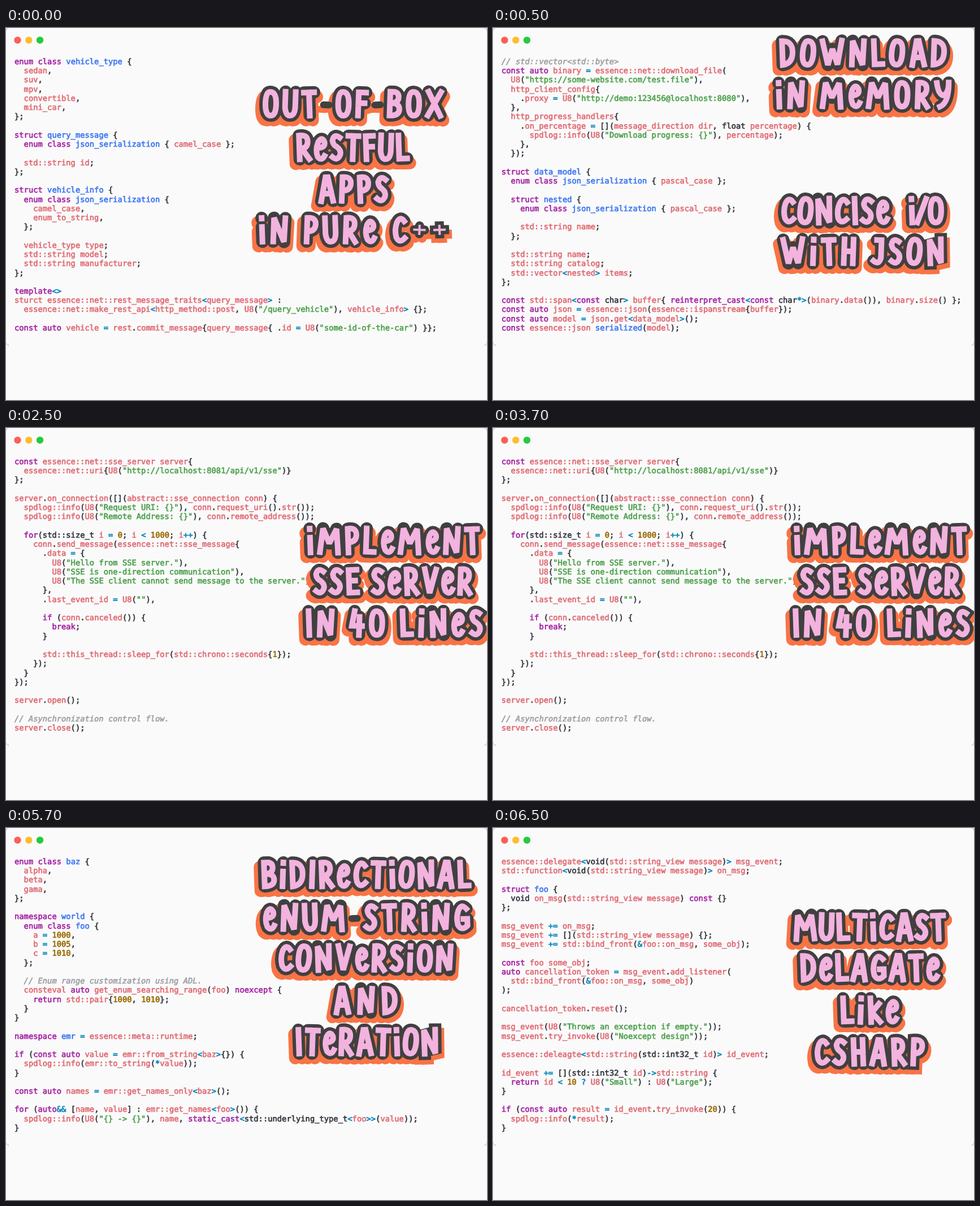
An HTML page for the animation above (8000 ms loop, 851x658 px).

```html
<!DOCTYPE html>
<html lang="en">
<head>
<meta charset="utf-8">
<title>C++ snippets</title>
<style>
html, body { margin: 0; width: 100%; height: 100%; overflow: hidden; background: #fafafa; }
svg { display: block; }
text {
  font: 13.79px "DejaVu Sans Mono", monospace;
  white-space: pre; text-rendering: geometricPrecision;
  fill: #383a42; stroke: #383a42; stroke-width: .7px;
}
.str { fill: #50a14f; stroke: #50a14f; }
.com { fill: #a0a1a7; stroke: #a0a1a7; font-style: italic; }
.def { fill: #4078f2; stroke: #4078f2; }
.key { fill: #a626a4; stroke: #a626a4; }
.num { fill: #986801; stroke: #986801; }
.var { fill: #e06c75; stroke: #e06c75; }
.op { fill: #0184bc; stroke: #0184bc; }
.title { fill: none; stroke-linecap: round; stroke-linejoin: round; }
.title :last-child { stroke-linecap: square; stroke-linejoin: miter; stroke-miterlimit: 2; }
</style>
</head>
<body>
<svg id="stage" width="851" height="658" viewBox="0 0 851 658">
  <path d="M0 5Q0 0 5 0M846 0Q851 0 851 5M851 556Q851 561 846 561M5 561Q0 561 0 556"
    fill="none" stroke="#555" stroke-dasharray="1 1.5"/>
  <circle cx="20.5" cy="21.5" r="6.2" fill="#ff5f56"/>
  <circle cx="40.3" cy="21.5" r="6.2" fill="#ffbd2e"/>
  <circle cx="60" cy="21.5" r="6.2" fill="#27c93f"/>
</svg>
<script>
// Each scene: start time, title lines [text, left, right, top], code.
const scenes = [
{ at: 0, title: [['OUT-OF-BOX', 448, 780, 113], ['ReSTFUL', 507, 720, 190],
  ['APPS', 546, 683, 264], ['iN PURe C++', 440, 787, 336]], code:
`enum class vehicle_type {
  sedan,
  suv,
  mpv,
  convertible,
  mini_car,
};

struct query_message {
  enum class json_serialization { camel_case };

  std::string id;
};

struct vehicle_info {
  enum class json_serialization {
    camel_case,
    enum_to_string,
  };

  vehicle_type type;
  std::string model;
  std::string manufacturer;
};

template<>
sturct essence::net::rest_message_traits<query_message> :
  essence::net::make_rest_api<http_method::post, U8("/query_vehicle"), vehicle_info> {};

const auto vehicle = rest.commit_message{query_message{ .id = U8("some-id-of-the-car") }};` },
{ at: 500, title: [['DOWNLOAD', 500, 810, 23], ['iN MeMORY', 493, 818, 97],
  ['CONCISe', 503, 708, 302], ['i/O', 728, 804, 302], ['WiTH JSON', 503, 805, 374]], code:
`// std::vector<std::byte>
const auto binary = essence::net::download_file(
  U8("https://some-website.com/test.file"),
  http_client_config{
    .proxy = U8("http://demo:123456@localhost:8080"),
  },
  http_progress_handlers{
    .on_percentage = [](message_direction dir, float percentage) {
      spdlog::info(U8("Download progress: {}"), percentage);
    },
  });

struct data_model {
  enum class json_serialization { pascal_case };

  struct nested {
    enum class json_serialization { pascal_case };

    std::string name;
  };

  std::string name;
  std::string catalog;
  std::vector<nested> items;
};

const std::span<const char> buffer{ reinterpret_cast<const char*>(binary.data()), binary.size() };
const auto json = essence::json(essence::ispanstream{buffer});
const auto model = json.get<data_model>();
const essence::json serialized(model);` },
{ at: 2500, title: [['iMPLeMeNT', 525, 845, 178], ['SSE SeRVeR', 537, 832, 250],
  ['IN 40 LiNeS', 523, 850, 324]], code:
`const essence::net::sse_server server{
  essence::net::uri{U8("http://localhost:8081/api/v1/sse")}
};

server.on_connection([](abstract::sse_connection conn) {
  spdlog::info(U8("Request URI: {}"), conn.request_uri().str());
  spdlog::info(U8("Remote Address: {}"), conn.remote_address());

  for(std::size_t i = 0; i < 1000; i++) {
    conn.send_message(essence::net::sse_message{
      .data = {
        U8("Hello from SSE server."),
        U8("SSE is one-direction communication"),
        U8("The SSE client cannot send message to the server.")
      },
      .last_event_id = U8(""),

      if (conn.canceled()) {
        break;
      }

      std::this_thread::sleep_for(std::chrono::seconds{1});
    });
  }
});

server.open();

// Asynchronization control flow.
server.close();` },
{ at: 4500, title: [['BiDIReCTiONAL', 445, 829, 61], ['eNUM-STRiNG', 448, 828, 137],
  ['CONVeRSiON', 475, 798, 209], ['AND', 573, 700, 284], ['ITeRATiON', 505, 772, 357]], code:
`enum class baz {
  alpha,
  beta,
  gama,
};

namespace world {
  enum class foo {
    a = 1000,
    b = 1005,
    c = 1010,
  };

  // Enum range customization using ADL.
  consteval auto get_enum_searching_range(foo) noexcept {
    return std::pair{1000, 1010};
  }
}

namespace emr = essence::meta::runtime;

if (const auto value = emr::from_string<baz>{}) {
  spdlog::info(emr::to_string(*value));
}

const auto names = emr::get_names_only<baz>();

for (auto&& [name, value] : emr::get_names<foo>()) {
  spdlog::info(U8("{} -> {}"), name, static_cast<std::underlying_type_t<foo>>(value));
}` },
{ at: 6500, title: [['MULTiCAST', 525, 808, 154], ['DeLAGATe', 537, 797, 226],
  ['Like', 608, 725, 301], ['CSHARP', 562, 770, 375]], code:
`essence::delegate<void(std::string_view message)> msg_event;
std::function<void(std::string_view message)> on_msg;

struct foo {
  void on_msg(std::string_view message) const {}
};

msg_event += on_msg;
msg_event += [](std::string_view message) {};
msg_event += std::bind_front(&foo::on_msg, some_obj);

const foo some_obj;
auto cancellation_token = msg_event.add_listener(
  std::bind_front(&foo::on_msg, some_obj)
);

cancellation_token.reset();

msg_event(U8("Throws an exception if empty."));
msg_event.try_invoke(U8("Noexcept design"));

essence::deleagte<std::string(std::int32_t id)> id_event;

id_event += [](std::int32_t id)->std::string {
  return id < 10 ? U8("Small") : U8("Large");
}

if (const auto result = id_event.try_invoke(20)) {
  spdlog::info(*result);
}` }];

// Hand lettering: width and centre line of each letter, 42 units tall.
const bowl = 'M1 42V0Q17-2 16 12 15 24 1 24';
const ring = 'M9 0Q20 0 19 21 18 42 9 42-1 42 0 21 1 0 9 0Z';
const glyphs = {
  A: [21, 'M0 42L9 0H13L21 42M4 29H18'],
  B: [18, 'M1 42V0H9Q17 2 16 11 15 19 4 20 19 20 18 32 17 42 1 42Z'],
  C: [17, 'M17 6Q10-4 4 8-1 20 2 34 7 46 17 36'],
  D: [20, 'M1 42V0Q20 0 19 21 18 40 1 42Z'],
  E: [15, 'M15 1H1V41H15M1 20H12'],
  e: [15, 'M2 22Q17 22 14 11 9 1 3 12-2 26 3 38 10 46 15 36'],
  F: [14, 'M1 42V1H14M1 20H12'],
  G: [20, 'M18 6Q10-4 4 8-1 20 2 34 8 46 19 36V24H12'],
  H: [18, 'M1 0V42M17 0V42M1 21H17'],
  I: [4, 'M2 0V42'],
  i: [4, 'M2 16V42M2 0V1'],
  J: [14, 'M5 1H13V32Q10 46 0 38'],
  k: [17, 'M1 0V42M16 10L3 25 17 42'],
  L: [15, 'M1 0V41H15'],
  M: [32, 'M0 42L4 0 16 26 28 0 32 42'],
  N: [22, 'M1 42V0L20 42 21 0'],
  O: [19, ring],
  P: [16, bowl],
  R: [18, bowl + 'M6 24L18 42'],
  S: [15, 'M14 4Q4-4 1 9 2 17 8 20 16 26 14 34 9 46 0 38'],
  T: [18, 'M0 1H18M9 1V42'],
  U: [18, 'M0 0V28Q2 42 9 42 17 42 18 28V0'],
  V: [20, 'M0 0L10 42 20 0'],
  W: [34, 'M0 0L8 42 17 14 25 42 34 0'],
  X: [22, 'M0 0L22 42M22 0L0 42'],
  Y: [21, 'M0 0Q2 20 10 22 20 20 21 0M21 0Q20 36 4 42'],
  4: [18, 'M4 0L0 26H18M13 10V42'],
  0: [19, ring],
  '/': [14, 'M0 42L14 0'],
  '+': [18, 'M0 21H18M9 14V28'],
  '-': [10, 'M0 23H10'],
  ' ': [2, '']
};
const thinner = { '+': 6, '-': 10 };
const edge = 22;
// Colour, stroke width and offset; the shadow falls to both sides.
const layers = [
  ['#f97345', edge, -7, 8], ['#f97345', edge, 5, 8],
  ['#404040', edge, 0, 0], ['#f2b3de', 10, 0, 0]
];

const tokens = new RegExp([
  '(?<str>".*?")', '(?<com>//.*)',
  '(?<def>(?<=(?:class|struct|namespace|json) )\\w+)',
  '(?<key>\\b(?:enum|class|struct|const|auto|template|for|if|return|break|namespace|noexcept|reinterpret_cast|static_cast)\\b)',
  '(?<type>\\b(?:void|char|float|[\\w:]+_t)\\b)',
  '(?<num>\\b\\d+\\b)', '(?<var>\\w[\\w:]*)', '(?<op>[-<>=*+&?]+)'
].join('|'), 'g');

const escape = s => s.replace(/&/g, '&amp;').replace(/</g, '&lt;');

function paint(match, ...rest) {
  const groups = rest.at(-1);
  const kind = Object.keys(groups).find(k => groups[k] !== undefined);
  return `<tspan class="${kind}">${escape(match)}</tspan>`;
}

const codeText = code => code.split('\n').map((line, i) =>
  `<text x="15" y="${64 + i * 16.24}">${line.replace(tokens, paint)}</text>`).join('');

// Spreads the letters of one line evenly between its outer edges, tilting them in turn.
function place([text, left, right, y]) {
  const chars = [...text];
  const ink = chars.reduce((sum, c) => sum + glyphs[c][0], 0);
  const gap = (right - left - edge - ink) / (chars.length - 1);
  let x = left + edge / 2;
  return chars.map((c, i) => {
    const letter = { c, x, y, tilt: i % 2 ? 2 : -2 };
    x += glyphs[c][0] + gap;
    return letter;
  });
}

function lettering(lines) {
  const letters = lines.flatMap(place);
  const label = lines.map(line => line[0]).join(' ');
  const layer = ([color, width, dx, dy]) => `<g stroke="${color}">` + letters.map(({ c, x, y, tilt }) => {
    const [w, d] = glyphs[c];
    return `<path d="${d}" stroke-width="${width - (thinner[c] || 0)}"
      transform="translate(${x + dx} ${y + dy}) rotate(${tilt} ${w / 2} 21)"/>`;
  }).join('') + '</g>';
  return `<g class="title" role="img" aria-label="${label}">${layers.map(layer).join('')}</g>`;
}

const stage = document.getElementById('stage');
const views = scenes.map(({ title, code }) => {
  const g = document.createElementNS('http://www.w3.org/2000/svg', 'g');
  g.innerHTML = codeText(code) + lettering(title);
  return stage.appendChild(g);
});

function draw() {
  const t = performance.now() % 8000;
  const current = scenes.findLastIndex(s => s.at <= t);
  views.forEach((g, i) => g.style.display = i === current ? '' : 'none');
  requestAnimationFrame(draw);
}
draw();
</script>
</body>
</html>
```
